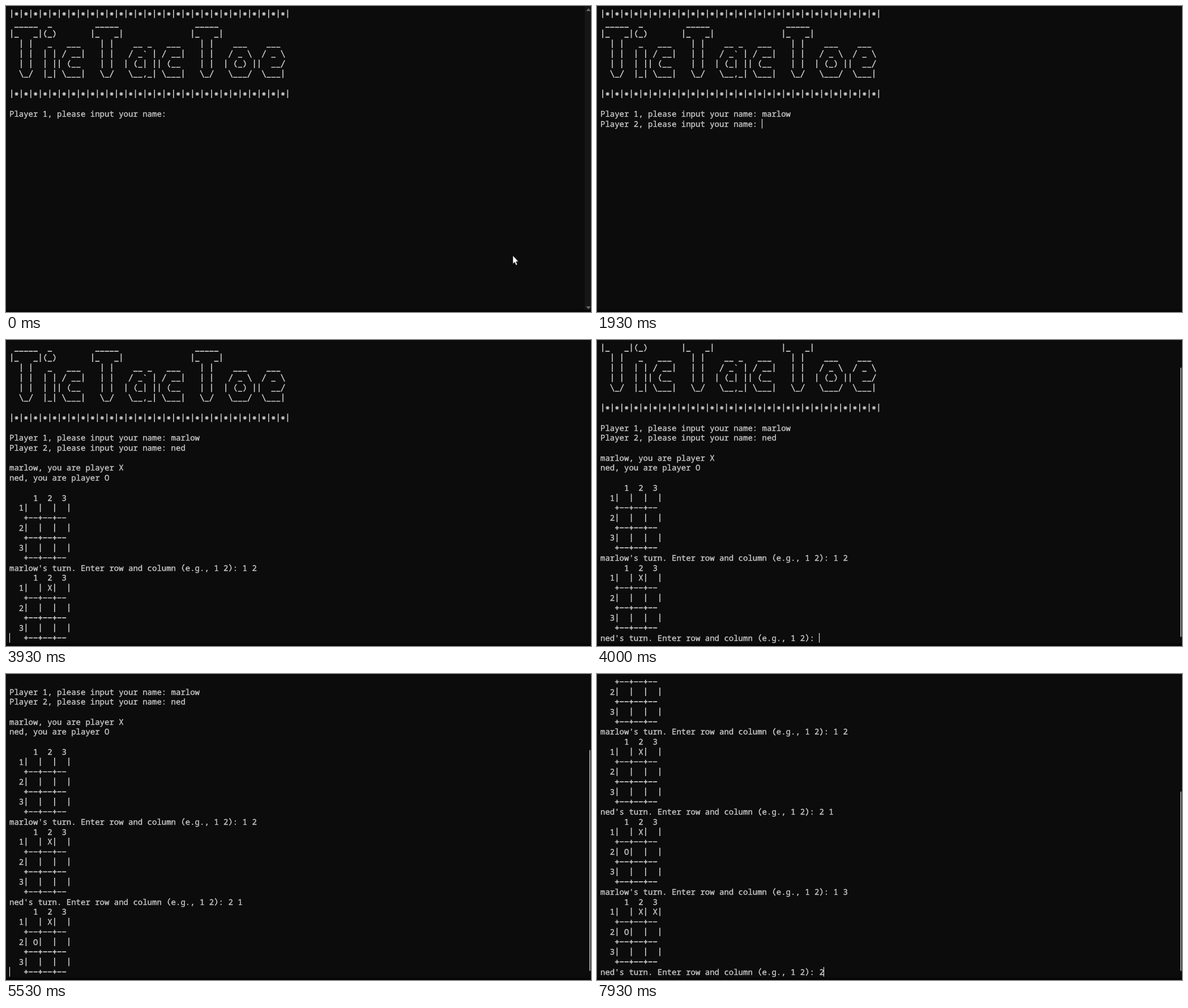
An HTML page that plays this animation: 1033 px wide and 542 px high, repeating every 8000 ms.

```html
<!DOCTYPE html>
<html lang="en">
<head>
<meta charset="utf-8">
<title>Tic Tac Toe in a terminal</title>
<style>
  html, body { margin: 0; width: 100%; height: 100%; overflow: hidden; background: #0c0c0c; }
  svg { display: block; width: 1033px; height: 542px; }
  text {
    font: 14px "Noto Sans Mono", "DejaVu Sans Mono", monospace;
    font-variant-ligatures: none;
    text-rendering: geometricPrecision;
    fill: #ccc;
    stroke: #ccc;
    stroke-width: .35;
  }
  .strokes { fill: none; stroke: #ccc; stroke-width: 1.6; }
</style>
</head>
<body>
<svg viewBox="0 0 1033 542">
  <rect width="1033" height="542" fill="#0c0c0c"/>
  <rect y="538" width="1033" height="4" fill="#070505"/>
  <g id="wideBar">
    <rect x="1022" width="11" height="538" fill="#161616"/>
    <path d="M1024.5 9l4-5l4 5zM1024.5 532l4 5l4-5z" fill="#6c6c6c"/>
  </g>
  <g id="screen"></g>
  <rect id="thinBar" x="1030" width="2" rx="1" fill="#9a9a9a"/>
  <rect id="caret" width="1" height="17" fill="#fff"/>
  <path id="mouse" d="M0 0V14.8L3.3 11.7L5.6 17.2L8 16.2L5.7 10.8H10Z" fill="#fff" stroke="#000" stroke-width=".6"/>
</svg>
<script>
const LOOP = 8000, TICK = 1000 / 15, BLINK = 565;
const LEFT = 6, TOP = 5, CELL = 8.4, ROW = 17.72, BASE = 13.8, ROWS = 30;
const P1 = "marlow", P2 = "ned";

const rule = "|" + "*|".repeat(29);
const banner = [
  " _____  _         _____                _____",
  "|_   _|(_)       |_   _|              |_   _|",
  "  | |   _   ___    | |    __ _   ___    | |    ___    ___",
  "  | |  | | / __|   | |   / _` | / __|   | |   / _ \\  / _ \\",
  "  | |  | || (__    | |  | (_| || (__    | |  | (_) ||  __/",
  "  \\_/  |_| \\___|   \\_/   \\__,_| \\___|   \\_/   \\___/  \\___|"
];

// line characters, as strokes relative to the cell's top left corner
const glyphs = {
  "|": "m4.2 1.4v14.9",
  "_": "m.4 14.9h7.6",
  "-": "m.6 8.7h7.2",
  "+": "m.7 8.7h7m-3.5-3.5v7",
  "*": "m.9 9h6.6m-5-2.9l3.4 5.8m0-5.8l-3.4 5.8",
  "/": "m7.3 2.4l-6.2 13.2",
  "\\": "m1.1 2.4l6.2 13.2",
  "(": "m6.4 2.4q-6.4 6.4 0 12.8",
  ")": "m2 2.4q6.4 6.4 0 12.8"
};

const lines = [rule, ...banner, "", rule, ""];
const prompts = [];
const cells = [0, 1, 2].map(() => [" ", " ", " "]);

function printBoard() {
  lines.push("     1  2  3");
  cells.forEach((row, r) =>
    lines.push(`  ${r + 1}|` + row.map(m => ` ${m}|`).join(""), "   +--+--+--"));
}

// shown: prompt appears; from, gap: key times; lag: pause between board and prompt
function prompt(label, input, shown, from, gap, lag = 0) {
  prompts.push({ line: lines.length, input, shown, from, gap, lag });
  lines.push(label);
}

function turn(who, mark, move, ...times) {
  printBoard();
  prompt(`${who}'s turn. Enter row and column (e.g., 1 2): `, move, ...times);
  const [r, c] = move.split(" ");
  if (c) cells[r - 1][c - 1] = mark;
}

prompt("Player 1, please input your name: ", P1, -660, 1130, 133);
prompt("Player 2, please input your name: ", P2, 1930, 2270, 130);
lines.push("", `${P1}, you are player X`, `${P2}, you are player O`, "");
turn(P1, "X", "1 2", 2870, 3330, 170);
turn(P2, "O", "2 1", 4000, 4730, 200, 70);
turn(P1, "X", "1 3", 5600, 6470, 230, 70);
turn(P2, "O", "2", 7400, 7930, 200);

const $ = id => document.getElementById(id);
const clamp = (v, max = 1) => Math.min(max, Math.max(0, v));

function set(el, attrs) {
  for (const k in attrs) el.setAttribute(k, attrs[k]);
}
function add(parent, tag, attrs, content = "") {
  const el = document.createElementNS("http://www.w3.org/2000/svg", tag);
  set(el, attrs);
  el.textContent = content;
  return parent.appendChild(el);
}

function drawLine(str, row) {
  const g = add($("screen"), "g", { transform: `translate(${LEFT} ${TOP + row * ROW})` });
  const d = [...str].map((ch, i) =>
    glyphs[ch] ? `M${(i * CELL).toFixed(1)} 0${glyphs[ch]}` : "").join("");
  if (d) add(g, "path", { d, class: "strokes" });
  const text = add(g, "text", { y: BASE });
  for (const w of str.replace(/[|_+*\/\\()-]/g, " ").matchAll(/\S+/g))
    add(text, "tspan", { x: w.index * CELL }, w[0]);
}

function stateAt(t) {
  const p = prompts.findLast(q => q.shown - q.lag <= t);
  if (t < p.shown) return { last: p.line - 1, count: 0, col: 0, on: 1 };
  const count = clamp(Math.floor((t - p.from) / p.gap) + 1, p.input.length);
  const lastKey = count ? p.from + (count - 1) * p.gap : p.shown;
  return {
    last: p.line,
    count,
    col: lines[p.line].length + count,
    on: 1 - Math.floor((t - lastKey) / BLINK) % 2
  };
}

function showText({ last, count }, scroll) {
  $("screen").replaceChildren();
  for (let i = scroll; i <= last; i++) {
    const p = prompts.find(q => q.line === i);
    const input = p ? p.input.slice(0, i === last ? count : undefined) : "";
    drawLine(lines[i] + input, i - scroll);
  }
}

function showPointer(t) {
  const tick = Math.floor((t + 4) / TICK);
  const u = clamp(tick / 8), e = u * u * (3 - 2 * u);
  set($("mouse"), {
    transform: `translate(${895 - 542.5 * e} ${442 - 241 * e})`,
    opacity: t < 1130 ? 1 : 0
  });
  set($("wideBar"), { opacity: 1 - clamp((tick - 2) / 4) });
}

const start = performance.now();
let shown = "";
function frame() {
  const t = (performance.now() - start) % LOOP;
  const s = stateAt(t);
  const scroll = Math.max(0, s.last - ROWS + 1);
  const key = s.last + ":" + s.count;
  if (key !== shown) showText(s, scroll);
  shown = key;

  set($("caret"), {
    x: Math.floor(LEFT + s.col * CELL),
    y: Math.round(TOP + (s.last - scroll) * ROW),
    opacity: s.on
  });
  const barTop = 17 + 509 * scroll / (scroll + ROWS);
  set($("thinBar"), { y: barTop, height: 526 - barTop, opacity: scroll > 1 ? 1 : 0 });
  showPointer(t);
  requestAnimationFrame(frame);
}
frame();
</script>
</body>
</html>
```
